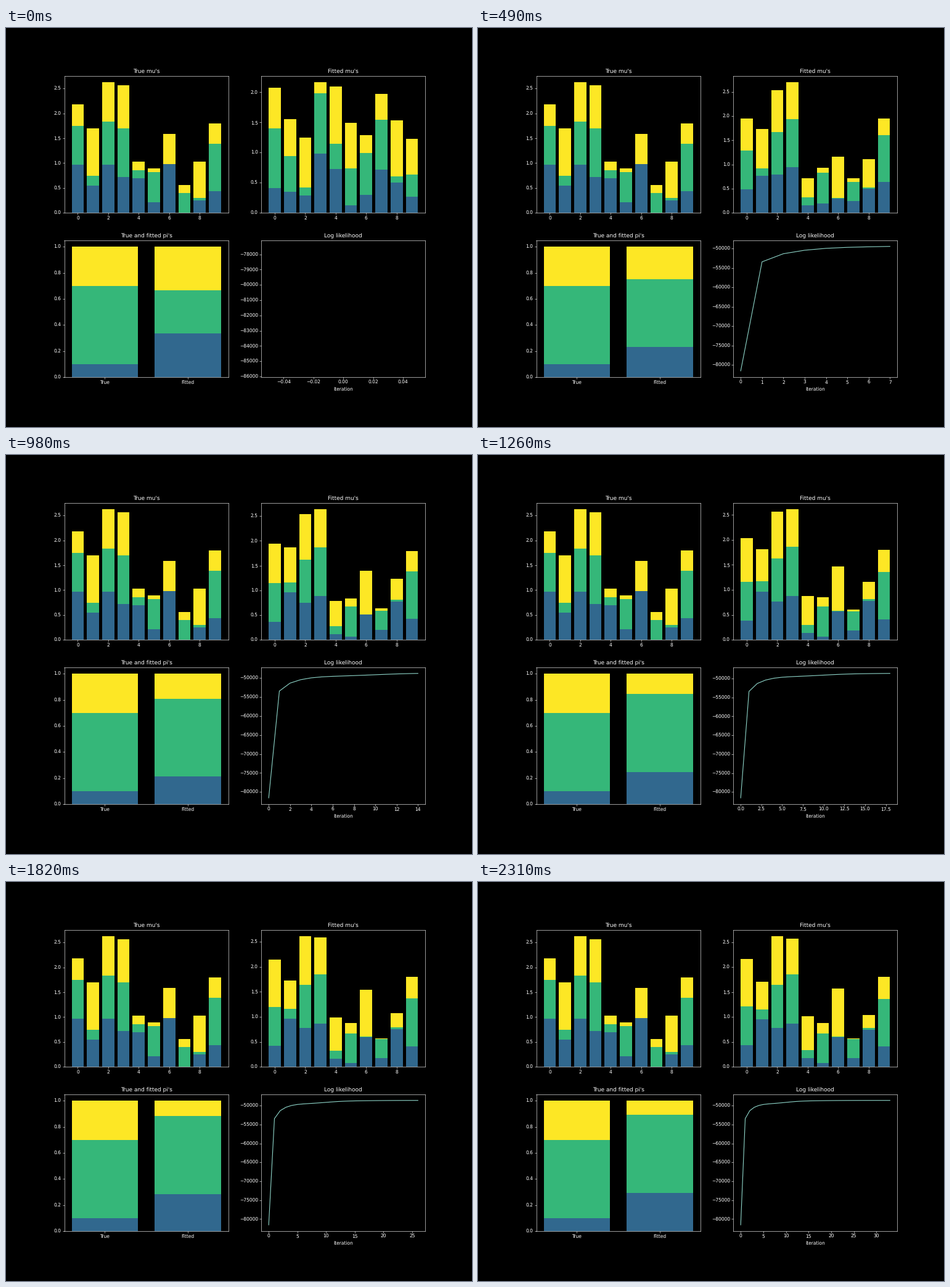
These frames come from a looping animation (756x648 px, 2.38 s). A matplotlib script:

```python
import itertools

import matplotlib.pyplot as plt
import numpy as np
from matplotlib.animation import FuncAnimation

FRAMES, INTERVAL = 34, 70
FEATURES, SAMPLES = 10, 10000
COLORS = plt.get_cmap("viridis")([1 / 3, 2 / 3, 1.0])

# A mixture of three components, each with ten on/off features.
TRUE_PI = np.array([.1, .6, .3])
TRUE_MU = np.random.RandomState(4).rand(3, FEATURES)

# The first guess, from which every later frame is computed.
START_PI = np.full(3, 1 / 3)
START_MU = np.array([
    [.41, .345, .289, .985, .73, .125, .30, .72, .504, .263],
    [.996, .595, .133, .995, .42, .615, .69, .829, .102, .374],
    [.671, .62, .825, .185, .942, .753, .303, .426, .933, .595]])

STATES = np.array(list(itertools.product([0, 1], repeat=FEATURES)))


def joint(pi, mu):
    """Probability of each component together with each feature vector."""
    mu = np.clip(mu, .001, .999)
    log_p = np.log(mu) @ STATES.T + np.log(1 - mu) @ (1 - STATES).T
    return pi[:, None] * np.exp(log_p)


def expectation_maximisation():
    weights = joint(TRUE_PI, TRUE_MU).sum(axis=0)
    pi, mu = START_PI, START_MU
    for _ in range(FRAMES):
        p = joint(pi, mu)
        total = p.sum(axis=0)
        yield pi, mu, SAMPLES * (weights @ np.log(total))
        share = p / total * weights
        pi = share.sum(axis=1)
        mu = share @ STATES / pi[:, None]


FIT_PI, FIT_MU, LIKELIHOOD = zip(*expectation_maximisation())

plt.style.use("dark_background")
plt.rcParams.update({"font.family": "DejaVu Sans", "text.hinting": "none"})
fig, ((true_ax, mu_ax), (pi_ax, ll_ax)) = plt.subplots(
    2, 2, figsize=(14, 12), dpi=54)
fig.subplots_adjust(left=.125, right=.9, bottom=.125, top=.88,
                    wspace=.2, hspace=.2)


def stacked(ax, x, heights, title):
    ax.clear()
    bottom = np.zeros(len(x))
    for height, color in zip(heights, COLORS):
        ax.bar(x, height, bottom=bottom, color=color)
        bottom = bottom + height
    ax.set_title(title)


def draw(n):
    stacked(mu_ax, range(FEATURES), FIT_MU[n], "Fitted mu's")
    stacked(pi_ax, ["True", "Fitted"], np.column_stack([TRUE_PI, FIT_PI[n]]),
            "True and fitted pi's")

    ll_ax.clear()
    ll_ax.plot(range(n + 1), LIKELIHOOD[:n + 1], color="#8dd3c7")
    ll_ax.set_title("Log likelihood")
    ll_ax.set_xlabel("Iteration")


stacked(true_ax, range(FEATURES), TRUE_MU, "True mu's")
anim = FuncAnimation(fig, draw, frames=FRAMES, interval=INTERVAL, repeat=True)
plt.show()
```
